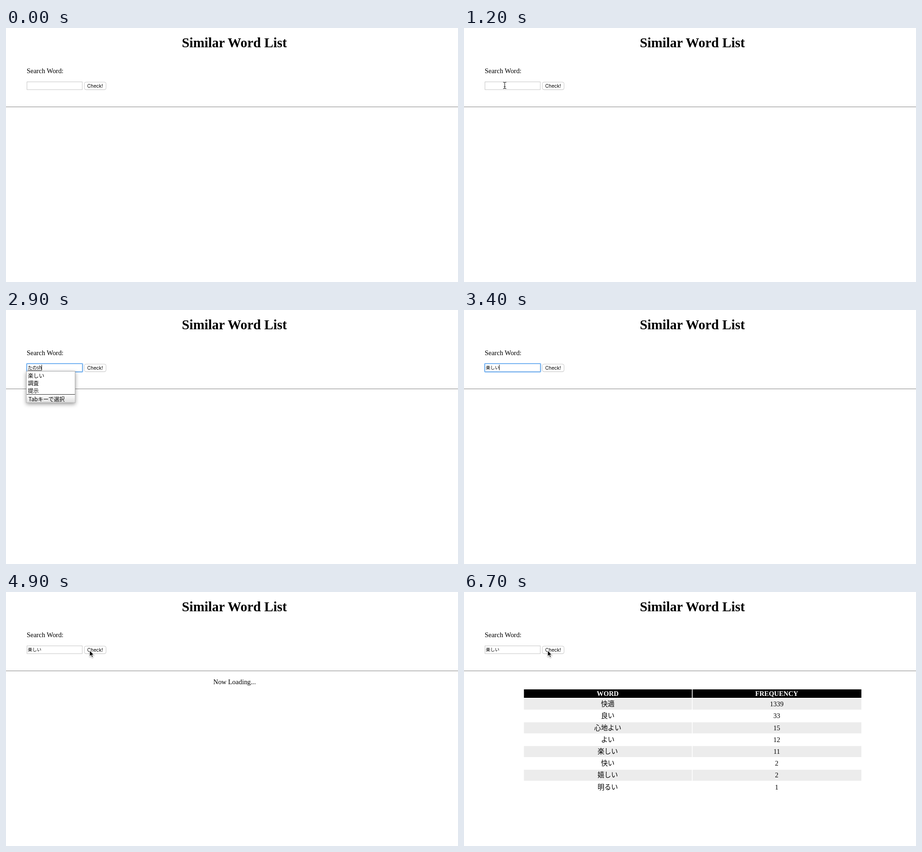
An HTML page for the animation above (7000 ms loop, 960 px wide and 540 px high).

```html
<!DOCTYPE html>
<html lang="ja">
<head>
<meta charset="utf-8">
<title>Similar Word List</title>
<style>
  html, body { margin: 0; width: 100%; height: 100%; overflow: hidden; background: #fff; }
  svg { display: block; width: 100%; height: 100%; }
  text { font: 14.4px "Liberation Serif", "Noto Sans CJK JP", "Noto Sans CJK", serif; }
  .mid { text-anchor: middle; }
  .title { font-size: 28.8px; font-weight: bold; }
  .head { font-weight: bold; fill: #fff; }
  .word { font-weight: 300; }
  .button { font: 10.1px Inter, sans-serif; }
  .field { font: 9.6px "Noto Sans CJK JP", "Noto Sans CJK", sans-serif; }
  .menu text { font: 11.6px "Noto Sans CJK JP", "Noto Sans CJK", sans-serif; }
  .menu { filter: drop-shadow(0 3px 4px rgba(0, 0, 0, .4)); }
</style>
</head>
<body>
<svg viewBox="0 0 960 540">
  <defs>
    <linearGradient id="footer" x2="0" y2="1">
      <stop stop-color="#fff"/><stop offset="1" stop-color="#dedede"/>
    </linearGradient>
  </defs>
  <text class="mid title" x="485" y="40.5">Similar Word List</text>
  <text x="44" y="96.3">Search Word:</text>
  <path d="M0 167.7H960" stroke="#999" stroke-width="1.2"/>

  <rect x="44.5" y="114.5" width="117.5" height="16.5" fill="#fff" stroke="#c6c6c6"/>
  <rect id="ring" x="44" y="114" width="118.7" height="17.6" rx="1" fill="none" stroke="#78b4f2" stroke-width="2.2"/>
  <text id="typed" class="field" x="46.3" y="126.2"></text>
  <path id="underline" stroke="#222" stroke-width=".9"/>
  <path id="caret" stroke="#000"/>

  <rect x="166.5" y="115.6" width="46" height="16" rx="3.5" fill="#aaa" opacity=".5"/>
  <rect x="166.5" y="115" width="46" height="16" rx="3.5" fill="#fff" stroke="#c4c4c4" stroke-width=".9"/>
  <text class="mid button" x="189.3" y="126.9">Check!</text>

  <g id="menu" class="menu">
    <rect x="43.3" y="130.2" width="103.5" height="66.6" fill="#fff" stroke="#a2a2a2" stroke-width=".9"/>
    <rect x="43.7" y="180" width="102.7" height="16.4" fill="url(#footer)"/>
    <path d="M44 179.5H146.5" stroke="#333"/>
    <text x="46.5" y="143.6">楽しい</text>
    <text x="46.5" y="160">調査</text>
    <text x="46.5" y="176.3">提示</text>
    <text x="47.7" y="194">Tabキーで選択</text>
  </g>

  <text id="loading" class="mid" x="485.4" y="196.3">Now Loading...</text>
  <g id="results"></g>

  <g id="beam" fill="none" stroke-linecap="round">
    <path d="M-3 -6.8Q0 -6.8 0 -5V5Q0 6.8 -3 6.8M3 -6.8Q0 -6.8 0 -5V5Q0 6.8 3 6.8M-1.5 2.5H1.5" stroke="#222" stroke-width="1.1"/>
  </g>
  <path id="arrow" d="M0 0V13.2L3 10.4L5 15L7.3 14L5.3 9.5H9.4Z" stroke="#fff" stroke-width="1.1" style="filter:drop-shadow(0 1px 1px rgba(0,0,0,.4))"/>
</svg>
<script>
const LOOP = 7000, STEP = 100;
const $ = id => document.getElementById(id);
const show = (id, on) => { $(id).style.display = on ? '' : 'none'; };
const between = (t, a, b) => t >= a && t < b;

const rows = [['快適', 1339], ['良い', 33], ['心地よい', 15], ['よい', 12],
  ['楽しい', 11], ['快い', 2], ['嬉しい', 2], ['明るい', 1]];
const band = (y, h, fill) => [[127.3, 356.6], [485.5, 358.5]]
  .map(([x, w]) => `<rect x="${x}" y="${y}" width="${w}" height="${h}" fill="${fill}"/>`).join('');
const pair = (y, left, right, style) =>
  `<text class="mid ${style}" x="305.3" y="${y}">${left}</text>
   <text class="mid ${style}" x="664.2" y="${y}">${right}</text>`;
$('results').innerHTML = band(207, 18, '#000') + pair(220.6, 'WORD', 'FREQUENCY', 'head') +
  rows.map(([word, count], i) => {
    const y = 226.7 + i * 25.2;
    return (i % 2 ? '' : band(y, 23.4, '#ececec')) + pair(y + 16.4, word, count, 'word');
  }).join('');

// Input text as the Japanese conversion progresses: [start, text]
const typing = [[0, ''], [2400, 't'], [2500, 'た'], [2600, 'たn'], [2700, 'たの'],
  [2800, 'たのs'], [2900, 'たのsh'], [3000, 'たのしい'], [3100, '楽しい']];

// Pointer path: [time, x, y]
const path = [[100, 10, 106], [900, 59, 99], [1200, 86.5, 122], [3700, 86.5, 122], [4500, 177.7, 124]];

function pointerAt(t) {
  const next = path.findIndex(p => p[0] > t);
  if (next < 0) return path[path.length - 1].slice(1);
  if (!next) return path[0].slice(1);
  const [t0, x0, y0] = path[next - 1], [t1, x1, y1] = path[next];
  const p = (t - t0) / (t1 - t0), e = p * p * (3 - 2 * p);
  return [x0 + (x1 - x0) * e, y0 + (y1 - y0) * e];
}

function draw(t) {
  const text = typing.filter(([start]) => start <= t).pop()[1];
  if ($('typed').textContent !== text) $('typed').textContent = text;
  const end = 46.3 + (text ? $('typed').getComputedTextLength() : .7);
  $('caret').setAttribute('d', `M${end} 116.5V128`);
  $('underline').setAttribute('d', `M46.5 128.5H${end}`);
  show('caret', between(t, 1500, 1900) || between(t, 2400, 3600) || between(t, 4100, 4600));
  show('underline', between(t, 2400, 3300));

  show('ring', between(t, 1500, 4900));
  $('ring').style.opacity = t < 1600 ? .6 : 1;
  show('menu', between(t, 2300, 3200));
  show('loading', between(t, 4900, 5300));
  show('results', t >= 5300);

  const [x, y] = pointerAt(t);
  const visible = between(t, 200, 2300) || t >= 3800;
  const overText = between(x, 42, 163);
  for (const [id, on] of [['beam', overText], ['arrow', !overText]]) {
    show(id, visible && on);
    $(id).setAttribute('transform', `translate(${x} ${y})`);
  }
}

const started = performance.now();
function tick() {
  const t = (performance.now() - started) % LOOP;
  draw(Math.floor(t / STEP) * STEP);
  requestAnimationFrame(tick);
}
tick();
</script>
</body>
</html>
```
